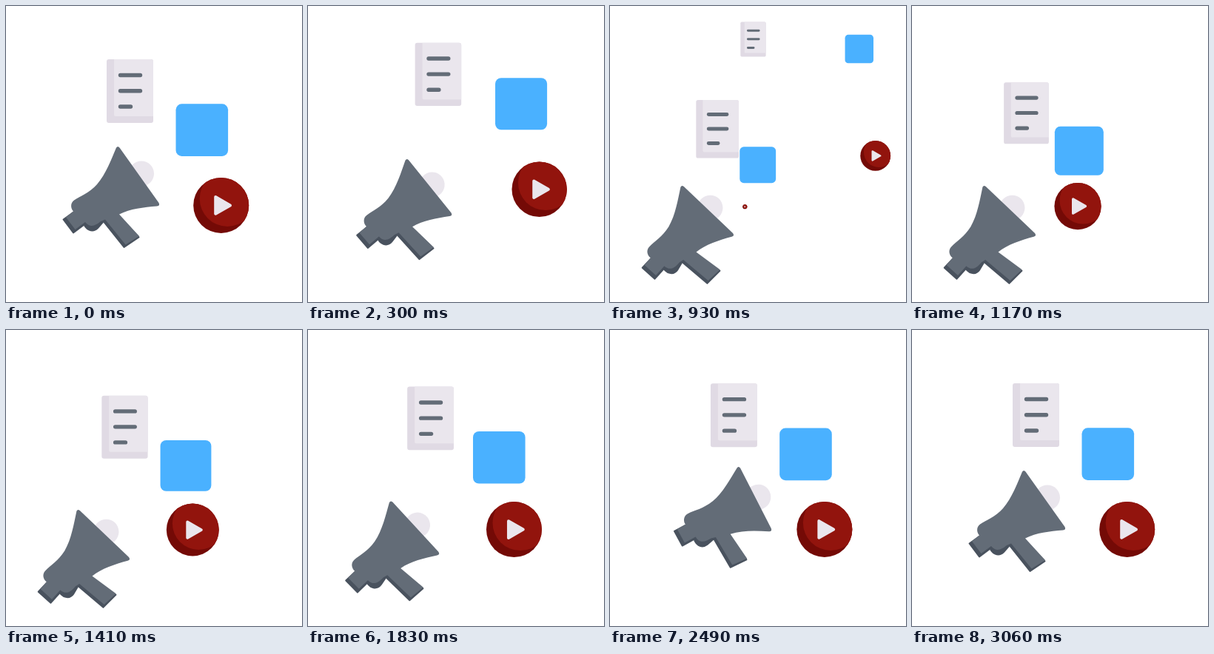
These frames come from a looping animation (400x400 px, 5.09 s). An HTML page:

```html
<!DOCTYPE html>
<html lang="en">
<head>
<meta charset="utf-8">
<title>Megaphone</title>
<style>
  html, body { margin: 0; width: 100%; height: 100%; overflow: hidden; background: #fff; }
  svg { display: block; width: 100%; height: 100%; }

  .horn, .out, .in { animation: 5090ms linear infinite; }
  .horn { animation-name: swing; }
  .out { animation-name: fly-out, shrink; }
  .page.in { animation-name: page-move, page-grow; }
  .tile.in { animation-name: tile-move, tile-grow; }
  .disc.in { animation-name: disc-move, disc-grow; }

  @keyframes swing {
    0% { translate: 0 0; rotate: 0deg; animation-timing-function: cubic-bezier(.37, 0, .63, 1); }
    15.32% { translate: -47px 47px; rotate: -11deg; }
    30.65% { translate: -47px 47px; rotate: -11deg; animation-timing-function: cubic-bezier(.37, 0, .63, 1); }
    48.92% { translate: 17px -1.5px; rotate: 8.3deg; animation-timing-function: cubic-bezier(.37, 0, .63, 1); }
    60.12%, 100% { translate: 0 0; rotate: 0deg; }
  }

  /* Old icons leave first, then collapse at their far point. */
  @keyframes fly-out {
    0% { translate: 0 0; animation-timing-function: cubic-bezier(.37, 0, .63, 1); }
    15.32%, 100% { translate: var(--x) var(--y); }
  }
  @keyframes shrink {
    0% { scale: 1; animation-timing-function: cubic-bezier(.5, 0, .75, 0); }
    22.2%, 100% { scale: 0; }
  }

  /* New icons burst from the horn one after another. */
  @keyframes page-move {
    0%, 13.16% { translate: var(--x) var(--y); animation-timing-function: cubic-bezier(.25, 1, .5, 1); }
    55.99%, 100% { translate: 0 0; }
  }
  @keyframes tile-move {
    0%, 15.32% { translate: var(--x) var(--y); animation-timing-function: cubic-bezier(.25, 1, .5, 1); }
    58.15%, 100% { translate: 0 0; }
  }
  @keyframes disc-move {
    0%, 17.49% { translate: var(--x) var(--y); animation-timing-function: cubic-bezier(.25, 1, .5, 1); }
    60.12%, 100% { translate: 0 0; }
  }
  @keyframes page-grow {
    0%, 13.16% { scale: 0; animation-timing-function: ease-out; }
    18.27% { scale: .915; animation-timing-function: ease-out; }
    27.7% { scale: .988; }
    39.3%, 100% { scale: 1; }
  }
  @keyframes tile-grow {
    0%, 15.72% { scale: 0; }
    18.27% { scale: .69; animation-timing-function: cubic-bezier(.2, .7, .5, 1); }
    27.7% { scale: .975; }
    36%, 100% { scale: 1; }
  }
  @keyframes disc-grow {
    0%, 18.07% { scale: 0; animation-timing-function: cubic-bezier(.2, .8, .5, 1); }
    27.7% { scale: .945; animation-timing-function: ease-out; }
    36%, 100% { scale: 1; }
  }
</style>
</head>
<body>
<svg viewBox="0 0 400 400">
  <defs>
    <clipPath id="rim"><circle r="37.5"/></clipPath>
    <g id="page">
      <rect x="-31.5" y="-43" width="63" height="86" rx="3" fill="#e0dae4"/>
      <path d="M-21.5-43H28.5a3 3 0 0 1 3 3V34H-19.5a2 2 0 0 1-2-2Z" fill="#eae6ed"/>
      <path d="M-13-21.5H14M-13-.3H14M-13 21H1" stroke="#636c77" stroke-width="5.4" stroke-linecap="round"/>
    </g>
    <rect id="tile" x="-35.3" y="-35.3" width="70.6" height="70.6" rx="8" fill="#4ab1ff"/>
    <g id="disc">
      <circle r="37.5" fill="#740a06"/>
      <circle cx="8.5" cy="-9" r="37.5" fill="#92140d" clip-path="url(#rim)"/>
      <path d="M-7.5-11.3 12.3 0-7.5 11.3Z" fill="#eae6ed" stroke="#eae6ed" stroke-width="4" stroke-linejoin="round"/>
    </g>
  </defs>

  <g transform="translate(167.5 115)">
    <use href="#page" class="page out" style="--x:26px;--y:-70px"/>
    <use href="#page" class="page in" style="--x:-37.5px;--y:86px"/>
  </g>
  <g transform="translate(264.8 167.6)">
    <use href="#tile" class="tile out" style="--x:72px;--y:-109.5px"/>
    <use href="#tile" class="tile in" style="--x:-87px;--y:63px"/>
  </g>
  <g transform="translate(290.7 269.4)">
    <use href="#disc" class="disc out" style="--x:68px;--y:-67px"/>
    <use href="#disc" class="disc in" style="--x:-117px;--y:2px"/>
  </g>

  <g transform="translate(178.5 229)">
    <g class="horn">
      <g transform="translate(-178.5 -229)">
        <circle cx="183" cy="226.5" r="17" fill="#eae6ed"/>
        <g fill="#49525e" stroke="#49525e" stroke-width="2" stroke-linejoin="round">
          <path d="M77.5 288.5 92 278 108 292 105 296 91 306.5Z"/>
          <path d="M104 291C107 303 117 307 124 300L131 292 128 284Z"/>
          <path d="M130 289 159.5 326 179.5 312.5 150 282Z"/>
        </g>
        <g fill="#636c77">
          <path d="M149 191.5Q151 188.5 153.5 191.5L206.5 266Q208.5 270 204 270.5C186 272 168 274 153 281.5L180 311 161.5 322.5 134 288.5 128 291C122 296 114 301 107 292L93.500 302 81 285.500 91 277.500C87 273 87 266 92 262.500C100 257 112 253 123 241C135 227 142 208 149 191.500Z"/>
        </g>
      </g>
    </g>
  </g>
</svg>
</body>
</html>
```
